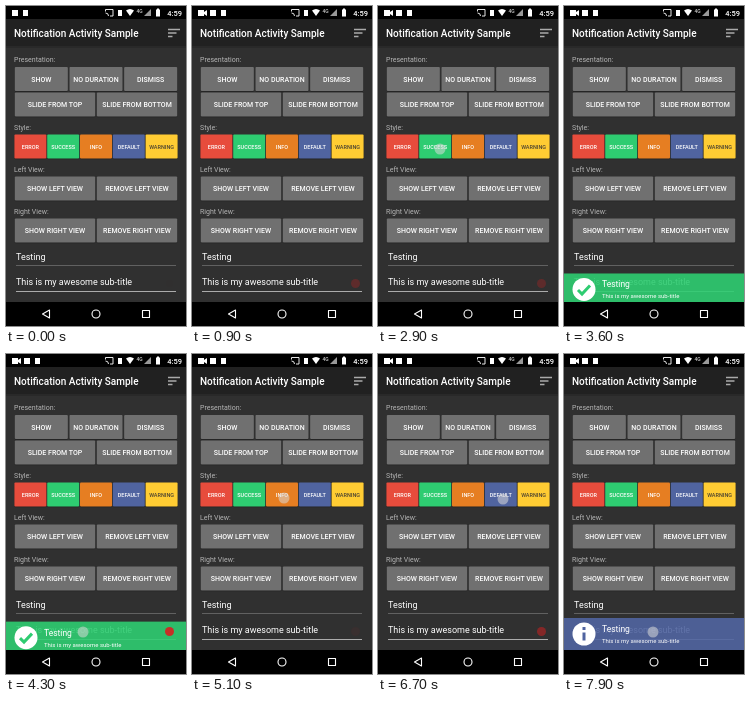
These frames come from a looping animation (180x320 px, 8 s). An HTML page:

```html
<!DOCTYPE html>
<html lang="en">
<head>
<meta charset="utf-8">
<title>Notification Activity Sample</title>
<style>
html, body { margin: 0; width: 100%; height: 100%; overflow: hidden; background: #000; }
svg { display: block; width: 180px; height: 320px; font-family: Roboto, "Open Sans", sans-serif; }
.label { font-size: 7px; fill: #b5b5b5; }
.btn { font-size: 7px; font-weight: 500; fill: #fff; text-anchor: middle; }
.small { font-size: 5.5px; }
.field { font-size: 9px; fill: #fff; }
.line { fill: none; stroke: #fff; }
</style>
</head>
<body>
<svg viewBox="0 0 180 320">
  <rect width="180" height="296" fill="#303030"/>
  <rect y="40" width="180" height="2" fill="#292929"/>
  <rect width="180" height="40" fill="#212121"/>
  <rect width="180" height="13" fill="#000"/>

  <!-- status bar -->
  <g fill="#fff">
    <path id="camera" d="M6 4h6v2l3-2v6l-3-2v2h-6z"/>
    <g id="icons">
      <rect x="6" y="4" width="6" height="6"/>
      <rect x="17" y="4" width="5" height="6"/>
    </g>
    <path class="line" stroke-width=".9" d="M99.500 5.500V3.500H107V10H104M99.500 7a3 3 0 0 1 3 3"/>
    <rect x="112" y="4" width="4" height="6"/>
    <path d="M120 4.500Q124 1.500 128 4.500L124 10z"/>
    <text x="130.500" y="7" font-size="5" font-weight="500" fill="#ccc">4G</text>
    <path d="M145 3v7h-7z" fill="#999"/>
    <path d="M150 3.500h1v-1h2v1h1v7h-4z"/>
    <text x="176" y="9.500" font-size="7.500" font-weight="500" text-anchor="end">4:59</text>
    <text x="8" y="30.500" font-size="10" font-weight="500">Notification Activity Sample</text>
  </g>
  <path class="line" style="stroke:#aaa" stroke-width="1.300" d="M162 23.500h12M162 27h8.500M162 30.500h4.500"/>

  <g id="form"></g>
  <text class="field" x="10" y="254">Testing</text>
  <text class="field" x="10" y="279">This is my awesome sub-title</text>
  <path class="line" stroke-width=".6" stroke-opacity=".4" d="M10 259.500H170"/>
  <path class="line" stroke-width=".7" stroke-opacity=".85" d="M10 285.500H170"/>

  <g id="note">
    <rect id="bar" y="264" width="180" height="32" fill-opacity=".9"/>
    <circle cx="20" cy="280" r="11.500" fill="#fff"/>
    <path id="mark" fill="none" stroke-width="3"/>
    <text x="38" y="278" font-size="8.500" fill="#fff">Testing</text>
    <text x="38" y="289" font-size="6" fill="#fff">This is my awesome sub-title</text>
  </g>
  <circle id="dot" cx="163.500" cy="277.500" r="4.500" fill="#d81f1f"/>
  <circle id="touch" r="5.500" fill="#d8d8d8"/>

  <!-- navigation bar -->
  <rect y="296" width="180" height="24" fill="#000"/>
  <g class="line" stroke-width="1.100" stroke-linejoin="round">
    <path d="M43.500 304v8l-7-4z"/>
    <circle cx="90" cy="308" r="4"/>
    <rect x="136.500" y="304.500" width="7" height="7"/>
  </g>
</svg>
<script>
const LOOP = 8000, SLIDE = 300;
const $ = id => document.getElementById(id);
const RED = '#e74c3c', GREEN = '#2ecc71', ORANGE = '#e67e22', BLUE = '#5064a0', YELLOW = '#ffcc33';
const CROSS = 'M15.5 275.5l9 9M24.5 275.5l-9 9';
const CHECK = 'M14 280.5l4 4 8-8.5';
const INFO = 'M20 273v3M20 278.5v8';

let form = '';
const label = (text, y) => form += `<text class="label" x="8" y="${y}">${text}</text>`;

function row(y, names, colors) {
  const step = 164 / names.length;
  names.forEach((name, i) => {
    const x = 8 + i * step, dark = colors && colors[i] === YELLOW;
    const inset = colors ? .4 : .8;
    form += `<rect x="${x + inset}" y="${y + .6}" width="${step - 2 * inset}" height="24.200" rx="1" fill="#222"/>
      <rect x="${x + inset}" y="${y}" width="${step - 2 * inset}" height="24" rx="1" fill="${colors ? colors[i] : '#707070'}"/>
      <text class="btn ${colors ? 'small' : ''}" x="${x + step / 2}" y="${y + (colors ? 14 : 14.5)}"
        ${dark ? 'style="fill:#4b4230"' : ''}>${name}</text>`;
  });
}

label('Presentation:', 56);
row(61, ['SHOW', 'NO DURATION', 'DISMISS']);
row(86.500, ['SLIDE FROM TOP', 'SLIDE FROM BOTTOM']);
label('Style:', 124);
row(128.500, ['ERROR', 'SUCCESS', 'INFO', 'DEFAULT', 'WARNING'], [RED, GREEN, ORANGE, BLUE, YELLOW]);
label('Left View:', 165.500);
row(170.500, ['SHOW LEFT VIEW', 'REMOVE LEFT VIEW']);
label('Right View:', 207.500);
row(212.500, ['SHOW RIGHT VIEW', 'REMOVE RIGHT VIEW']);
$('form').innerHTML = form;

const notes = [
  { color: RED, mark: CROSS, show: 1050, hide: 2100 },
  { color: GREEN, mark: CHECK, show: 3400, hide: 4200 },
  { color: ORANGE, mark: INFO, show: 5450, hide: 5980 },
  { color: BLUE, mark: INFO, show: 7220, hide: 8100 }
];

// start, end, x, y
const touches = [
  [600, 850, 27, 143], [1980, 2200, 80, 278],
  [2800, 3020, 62, 143], [4120, 4380, 77, 278],
  [4950, 5180, 92, 144], [5870, 6080, 84, 278],
  [6580, 6820, 125, 145], [7810, 8100, 89, 278]
];

const clamp = v => Math.max(0, Math.min(1, v));

function draw(t) {
  const early = t < 300;
  $('camera').setAttribute('opacity', early ? 0 : 1);
  $('icons').setAttribute('transform', `translate(${early ? 0 : 12})`);

  const note = notes.find(n => t >= n.show && t < n.hide + SLIDE);
  $('note').setAttribute('visibility', note ? 'visible' : 'hidden');
  if (note) {
    const enter = 1 - clamp((t - note.show) / SLIDE);
    const leave = clamp((t - note.hide) / SLIDE);
    $('note').setAttribute('transform', `translate(0 ${32 * (enter ** 2 + leave ** 2)})`);
    $('bar').setAttribute('fill', note.color);
    $('mark').setAttribute('d', note.mark);
    $('mark').setAttribute('stroke', note.color);
  }

  const phase = t % 2000;
  $('dot').setAttribute('opacity', .9 * Math.min(clamp(phase / 250), clamp((1150 - phase) / 800)));

  const tap = touches.find(([start, end]) => t >= start && t < end);
  $('touch').setAttribute('opacity', tap ? .55 * clamp((tap[1] - t) / 80) : 0);
  if (tap) $('touch').setAttribute('transform', `translate(${tap[2]} ${tap[3]})`);
}

const origin = performance.now();
function frame() {
  draw((performance.now() - origin) % LOOP);
  requestAnimationFrame(frame);
}
frame();
</script>
</body>
</html>
```
